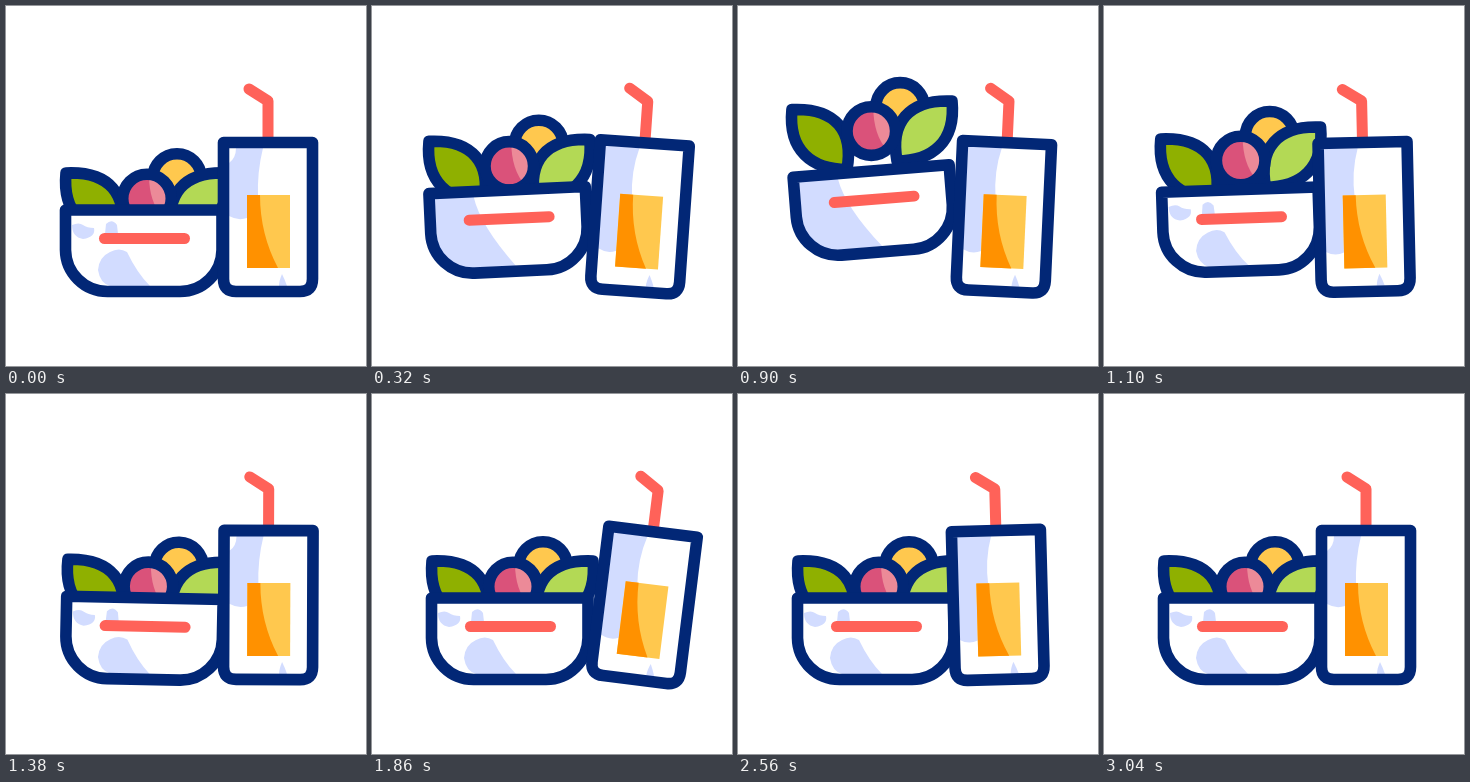
Write an HTML page that moves like this. It is 360x360 px and loops after 3.42 s.

```html
<!DOCTYPE html>
<html lang="en">
<head>
<meta charset="utf-8">
<title>Salad and juice</title>
<style>
  html, body { margin: 0; width: 100%; height: 100%; overflow: hidden; background: #fff; }
  svg { display: block; width: 100%; height: 100%; }
  .line { stroke: #022776; stroke-width: 11.6; stroke-linejoin: round; stroke-linecap: round; }
  .red { fill: none; stroke: #ff6259; stroke-width: 11; stroke-linejoin: round; stroke-linecap: round; }
  .shade { fill: #d2dcff; }
</style>
</head>
<body>
<svg viewBox="0 0 360 360">
  <defs>
    <path id="leaf" d="M60 167C104 165 122 189 115 227C80 227 56 208 60 167Z"/>
    <path id="bowlForm" d="M59.5 204H216V244A42 42 0 0 1 174 285.500H101.500A42 42 0 0 1 59.500 244Z"/>
    <path id="glassForm" d="M217.500 136.500H306.500V273Q306.500 285.500 294 285.500H230Q217.500 285.500 217.500 273Z"/>
  </defs>
  <g id="veg">
    <g id="lemon"><circle class="line" cx="171" cy="172" r="24.300" fill="#ffc84e"/></g>
    <g id="leafL"><use href="#leaf" class="line" fill="#8fb000"/></g>
    <g id="leafR"><use href="#leaf" class="line" fill="#b3d955" transform="matrix(-1 0 0 1 281 0)"/></g>
    <g id="berry">
      <circle cx="141" cy="192.500" r="24.300" fill="#da527a"/>
      <path fill="#ec8a98" d="M143 169Q143 196 157 212A24 24 0 0 0 143 169Z"/>
      <circle class="line" cx="141" cy="192.500" r="24.300" fill="none"/>
    </g>
  </g>
  <g id="bowl">
    <use href="#bowlForm" fill="#fff"/>
    <path class="shade" id="bowlShade"/>
    <use href="#bowlForm" class="line" fill="none"/>
    <path class="red" d="M98.500 232.500H178.500"/>
  </g>
  <g id="glass">
    <path class="red" d="M262 136V95L243 83"/>
    <use href="#glassForm" fill="#fff"/>
    <path class="shade" id="glassShade"/>
    <path class="shade" d="M276 268Q279 274 281 280H273Q273 275 276 268Z"/>
    <path fill="#ffc84e" d="M241 189H284V262H241Z"/>
    <path fill="#ff9100" d="M241 189H254Q254 228 272 262H241Z"/>
    <use href="#glassForm" class="line" fill="none"/>
  </g>
</svg>
<script>
const LOOP = 3420;
const $ = id => document.getElementById(id);
const set = (id, name, value) => $(id).setAttribute(name, value);

// Sine-eased value through [time, value] keys
function track(keys, t) {
  const i = keys.findIndex(k => k[0] > t);
  if (i < 0) return keys[keys.length - 1][1];
  const [t0, a] = keys[i - 1], [t1, b] = keys[i];
  return a + (b - a) * (1 - Math.cos(Math.PI * (t - t0) / (t1 - t0))) / 2;
}

const tilt = [[0, 0], [600, 7.3], [1190, -1.8], [1800, 7.3], [2410, -1.8], [3000, 0]];
const rock = [[0, 0], [620, -5], [800, -5], [1400, 1.2], [1640, -0.5], [1840, 0]];
const hop = (fall, t) => track([[0, 0], [670, 1], [fall, 1], [1400, 0]], t);

// id, sideways shift, rise, time the fall begins
const pieces = [
  ['leafL', -6.5, -68, 800],
  ['berry', -8, -70, 830],
  ['lemon', -9, -72, 860],
  ['leafR', -7, -72, 890]
];

const bowlShades = {
  full: 'M65 209H104Q109 238 143 280H100Q65 278 65 242Z',
  part: 'M66 219Q73 216 77 219T88 222Q90 231 77 233Q66 231 66 219Z' +
        'M100 218Q106 212 111 219L112 228H99Z' +
        'M92 264Q93 251 104 246Q113 241 121 246Q131 267 144 280H104Q94 277 92 264Z'
};
const glassShades = {
  full: 'M223 142H257Q250 166 253 192H241V246Q232 250 223 245Z',
  part: 'M230 142H257Q251 166 252 192H241V212Q232 215 223 210V157Q230 152 230 142Z'
};

function draw(t) {
  const angle = track(tilt, t), turn = track(rock, t);
  set('glass', 'transform', `rotate(${angle} 262 291)`);
  set('bowl', 'transform', `translate(0 ${-43 * hop(780, t)}) rotate(${turn} 137 262)`);
  set('veg', 'transform', `rotate(${Math.max(0, turn)} 137 262)`);
  for (const [id, dx, dy, fall] of pieces) {
    const p = hop(fall, t);
    set(id, 'transform', `translate(${dx * p} ${dy * p})`);
  }
  set('bowlShade', 'd', bowlShades[t > 100 && t < 1000 ? 'full' : 'part']);
  set('glassShade', 'd', glassShades[Math.abs(angle) > 0.6 ? 'full' : 'part']);
}

const start = performance.now();
function frame() {
  const t = (performance.now() - start) % LOOP;
  draw(t < 3040 ? Math.floor(t / 20) * 20 : 3040);
  requestAnimationFrame(frame);
}
frame();
</script>
</body>
</html>
```
